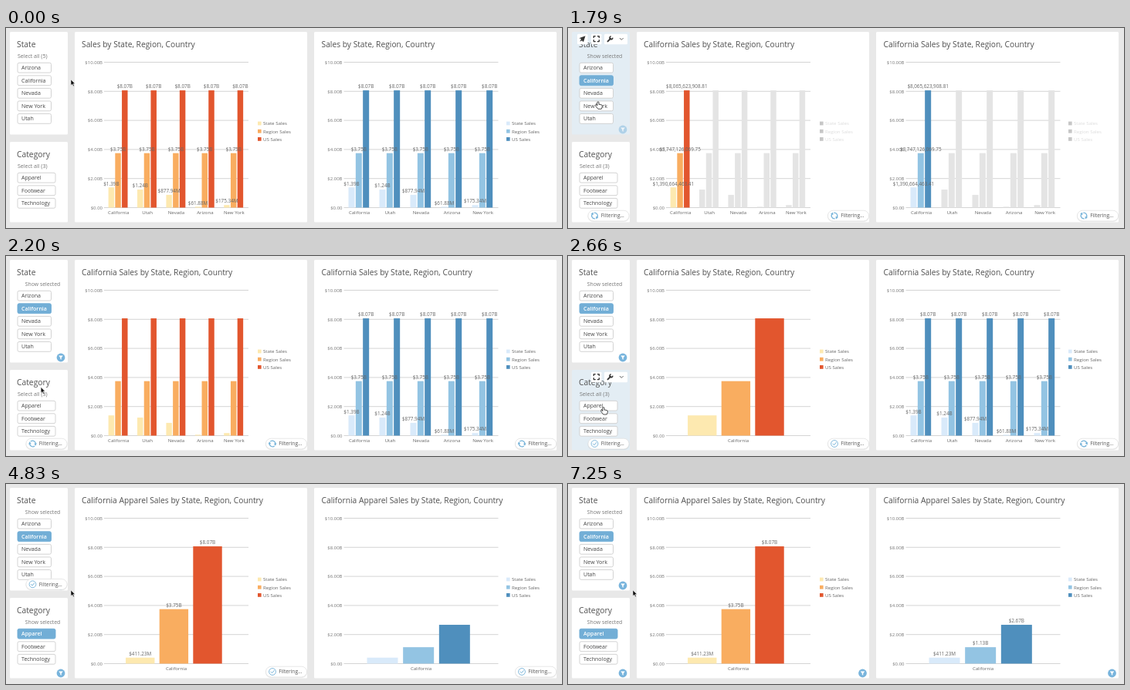
These frames come from a looping animation (720x260 px, 8 s). An HTML page:

```html
<!DOCTYPE html>
<html lang="en">
<head>
<meta charset="utf-8">
<title>Sales dashboard</title>
<style>
html, body { margin: 0; width: 100%; height: 100%; overflow: hidden; background: #e8e8e8; }
svg { display: block; width: 720px; height: 260px; font-family: "Open Sans", sans-serif; }
</style>
</head>
<body>
<svg id="stage" viewBox="0 0 720 260"></svg>
<script>
const LOOP = 8000;
const BASE = 233.5, UNIT = 18.9;
const svg = document.getElementById('stage');

const STATES = ['California', 'Utah', 'Nevada', 'Arizona', 'New York'];
const SALES = [1.39066, 1.24, 0.87794, 0.06188, 0.17534];
const SHORT = ['$1.39B', '$1.24B', '$877.94M', '$61.88M', '$175.34M'];
const EXACT = { 0: '$1,390,664,463.41', 2: '$877,943,757.07' };
const REGION = 3.747126, US = 8.065624, APPAREL = 0.41123;

const clamp = v => Math.max(0, Math.min(1, v));
const ramp = (t, a, b) => clamp((t - a) / (b - a));
const ease = (t, a, b) => { const u = ramp(t, a, b); return u * u * (3 - 2 * u); };
const mix = (a, b, u) => a + (b - a) * u;
const within = (t, a, b) => t >= a && t < b;

const rect = (x, y, w, h, fill, extra = '') =>
  `<rect x="${x}" y="${y}" width="${w}" height="${h}" fill="${fill}" ${extra}/>`;
const text = (x, y, size, str, fill = '#666', anchor = 'start') =>
  `<text x="${x}" y="${y}" font-size="${size}" fill="${fill}" text-anchor="${anchor}">${str}</text>`;
const group = (x, y, body, extra = '') => `<g transform="translate(${x} ${y})" ${extra}>${body}</g>`;
const stroke = (d, color, w = 1) =>
  `<path d="${d}" fill="none" stroke="${color}" stroke-width="${w}" stroke-linecap="round" stroke-linejoin="round"/>`;

// Charts

const CHARTS = [
  { panel: [89, 301], x: 127, w: 187, title: 98, legend: 326, colors: ['#fde9b0', '#f9ad60', '#e2562e'],
    single: [2250, 2480], end: [APPAREL, REGION, US], endText: ['$411.23M', '$3.75B', '$8.07B'],
    labels: [[0, 1250], [2900, 4330], [4830, LOOP]], fade: 1,
    badge: { on: 1150, off: 6400, spin: [[0, 2450], [3600, 4400]] } },
  { panel: [399, 314], x: 437.5, w: 200, title: 408.5, legend: 648, colors: ['#d9eafa', '#93c4e3', '#4f8fbd'],
    single: [3050, 3300], end: [APPAREL, 1.13, 2.67], endText: ['$411.23M', '$1.13B', '$2.67B'],
    labels: [[0, 1250], [2150, 3000], [3700, 4330], [5000, LOOP]], fade: 250,
    badge: { on: 1150, off: 6450, spin: [[0, 3250], [3600, 4450]] } }
];

function focusAt(t) {
  if (within(t, 1300, 1850)) return 0;
  return within(t, 1850, 2150) ? 2 : -1;
}

function drawChart(c, t) {
  const k = ease(t, ...c.single), shrink = ease(t, 4330, 4580);
  const focus = focusAt(t), dim = focus >= 0;
  const pitch = mix(c.w / 5, c.w, k);
  const barW = pitch * 0.2, step = pitch * 0.7 / 3;
  const prefix = t < 1060 ? '' : t < 3000 ? 'California ' : 'California Apparel ';
  let out = rect(c.panel[0], 5, c.panel[1], 247.5, '#fff', 'rx="1.5"');
  out += text(c.title, 25, 10.25, prefix + 'Sales by State, Region, Country', '#505050');

  for (let i = 0; i <= 5; i++) {
    const y = BASE - i * 2 * UNIT;
    out += rect(c.x, y - 0.5, c.w, 1, '#d4d4d4');
    out += text(c.x - 2, y + 2.2, 6, '$' + (i * 2).toFixed(2) + (i ? 'B' : ''), '#777', 'end');
  }

  let tags = '';
  const span = c.labels.find(([a, b]) => within(t, a, b));
  const shown = dim ? 1 : span ? (span[0] < 4800 ? 1 : ramp(t, span[0], span[0] + c.fade)) : 0;
  STATES.forEach((name, g) => {
    const alpha = g ? clamp(1 - k * 3) : 1;
    if (!alpha) return;
    const gx = c.x + g * pitch;
    const start = [SALES[g], REGION, US];
    const vals = start.map((v, i) => g ? v : mix(v, c.end[i], shrink));
    const on = !dim || focus === g;
    let bars = vals.map((v, i) => rect(gx + pitch * 0.15 + i * step, BASE - v * UNIT, barW, v * UNIT,
      on ? c.colors[i] : '#e4e4e4')).join('');
    bars += text(gx + pitch / 2, 242.2, 6.1, name, '#666', 'middle');
    out += `<g opacity="${alpha}">${bars}</g>`;
    if (!on || !shown) return;
    const names = dim ? [EXACT[g], '$3,747,126,069.75', '$8,065,623,908.81']
      : t > 4330 ? c.endText : [SHORT[g], '$3.75B', '$8.07B'];
    vals.forEach((v, i) => {
      tags += text(gx + pitch * 0.15 + i * step + barW / 2, BASE - v * UNIT - 2.7, 6.35, names[i], '#666', 'middle');
    });
  });
  out += `<g opacity="${shown}">${tags}</g>`;

  ['State Sales', 'Region Sales', 'US Sales'].forEach((s, i) => {
    const y = 124 + i * 10.2;
    out += rect(c.legend, y - 2.4, 4.6, 4.8, dim ? '#c6c6c6' : c.colors[i]);
    out += text(c.legend + 7, y + 2.3, 6.15, s, dim ? '#dcdcdc' : '#666');
  });
  const right = c.panel[0] + c.panel[1];
  return out + funnel(right - 8.5, 246, ramp(t, c.badge.off, c.badge.off + 180)) + badge(right, 244, c.badge, t, 180);
}

// Small parts

function funnel(x, y, alpha) {
  return alpha ? group(x, y, '<circle r="5.4" fill="#78b4dc"/><path d="M-2.8-2.5H2.8L.7.2V2.8L-.7 2V.2Z" fill="#fff"/>',
    `opacity="${alpha}"`) : '';
}

function badge(right, y, b, t, out) {
  const alpha = Math.min(ramp(t, b.on, b.on + 200), 1 - ramp(t, b.off, b.off + out));
  if (!alpha) return '';
  const blue = '#76b3d9';
  const spin = b.spin.some(([a, z]) => within(t, a, z));
  const icon = spin
    ? `<g transform="rotate(${t * 0.36 % 360})">` +
      stroke('M-3.7 1.2A3.9 3.9 0 0 1 1.6-3.5M3.7-1.2A3.9 3.9 0 0 1-1.6 3.5', blue, 1.3) +
      `<path d="M1-5.3L3.8-3 .6-1.7ZM-1 5.3L-3.8 3-.6 1.7Z" fill="${blue}"/></g>`
    : `<circle r="4.4" fill="none" stroke="${blue}" stroke-width=".9"/>` + stroke('M-2 .1L-.5 1.7 2.2-1.5', blue, 1);
  const body = rect(-54, -6, 54, 14, '#000', 'rx="7" opacity=".07"') +
    rect(-53.6, -6.8, 53.2, 13.8, '#fff', 'rx="6.9" stroke="#ddd" stroke-width=".7"') +
    group(-45, 0, icon) + text(-36.8, 2.4, 6.6, 'Filtering...', '#555');
  return group(right, y + (1 - alpha) * 6, body, `opacity="${alpha}"`);
}

function toolbar(y, full) {
  const ink = '#333';
  const box = (x, w) => rect(x, -6.5, w, 13.5, '#fff', 'rx="1.5"');
  let out = box(30, 13.5) + box(47, 30);
  if (full) out += box(12, 13.5) + `<path d="M22.5-4L14.3-.9 17-.1 15.5 3.6 18 2 20 4Z" fill="${ink}"/>`;
  out += stroke('M33.3-1.6V-3.6H35.3M38.3-3.6H40.3V-1.6M40.3 1.4V3.4H38.3M35.3 3.4H33.3V1.4', ink, 1.3);
  out += stroke('M51.5 3.2L55.2-.6', ink, 1.9) + stroke('M55.3-3.3A2 2 0 1 0 57.8-.9', ink, 1.5);
  out += stroke('M67.2-.9L69.3 1.2 71.4-.9', '#555', 0.9);
  return group(0, y, out);
}

// Filter panels

const FILTERS = [
  { y: 5, h: 133.5, title: 'State', all: 'Select all (5)', items: ['Arizona', 'California', 'Nevada', 'New York', 'Utah'],
    w: 43.5, pick: 1, click: 1000, hover: [130, 2200], dot: 132, dotOn: [1600, 2000], badgeY: 130.3,
    badge: { on: 3350, off: 5790, spin: [[0, 4400]] }, out: 45 },
  { y: 148, h: 104.5, title: 'Category', all: 'Select all (3)', items: ['Apparel', 'Footwear', 'Technology'],
    w: 49, pick: 0, click: 2850, hover: [2300, 3750], dot: 246, dotOn: [3700, 3900], badgeY: 244,
    badge: { on: 1150, off: 3700, spin: [[0, 2500]] }, out: 200 }
];

function drawFilter(f, t) {
  const hovered = within(t, ...f.hover), picked = t >= f.click;
  let out = rect(5, f.y, 75, f.h, hovered ? '#e3edf4' : '#fff', 'rx="1.5"');
  out += text(14, f.y + 20, 10.3, f.title, '#505050');
  out += picked ? text(70.3, f.y + 34.3, 6.85, 'Show selected', '#777', 'end')
    : text(15, f.y + 34.3, 7, f.all, '#777');
  f.items.forEach((name, i) => {
    const y = f.y + 46.6 + i * 16.55, on = picked && i === f.pick;
    const warm = f.y === 5 && ((i === 1 && within(t, 200, 1000)) || (i === 2 && within(t, 1850, 2150)));
    out += rect(15, y - 6.3, f.w, 12.8, on ? '#72aed6' : warm ? '#dce9f3' : '#fff',
      `rx="2" stroke="${on ? '#72aed6' : '#cfcfcf'}" stroke-width=".9"`);
    out += `<g font-weight="${on ? 600 : 500}">${text(20, y + 2.5, 7.05, name, on ? '#fff' : '#444')}</g>`;
  });
  if (hovered) out += toolbar(f.y + 9.2, picked);
  return out + funnel(71, f.dot, ramp(t, ...f.dotOn)) + badge(79.5, f.badgeY, f.badge, t, f.out);
}

// Pointer: time, x, y
const PATH = [
  [0, 84, 67], [40, 84, 67], [250, 38, 66], [1400, 38, 66], [1790, 39, 96], [2000, 44.5, 149],
  [2450, 46, 197], [3150, 46, 197], [3450, 60, 180], [3950, 84, 138], [LOOP, 84, 138]
];

function pointer(t) {
  const i = PATH.findIndex((p, n) => n && t <= p[0]);
  const a = PATH[i - 1], b = PATH[i], u = ramp(t, a[0], b[0]);
  const x = mix(a[1], b[1], u), y = mix(a[2], b[2], u);
  const top = y > 150 ? 188 : 45, bottom = y > 150 ? 234 : 124;
  const link = x > 15 && x < 64 && y > top && y < bottom || within(t, 3150, 3550);
  const d = link
    ? 'M-1.2 .2Q0-1 1 .2V3.2L2 2.9 3 3.5 4 3.4 5.2 4.2V6.6L4.2 9H-.2L-3.2 5.2Q-3-.1-1.2 4.6Z'
    : 'M0 0V7.6L1.8 6 3.1 8.8 4.3 8.2 3.1 5.5H5.4Z';
  const paint = link ? 'fill="#fff" stroke="#222" stroke-width=".8"' : 'fill="#111" stroke="#fff" stroke-width=".5"';
  return group(x, y, `<path d="${d}" ${paint} stroke-linejoin="round"/>`);
}

function draw(t) {
  svg.innerHTML = rect(0, 0, 720, 260, '#e8e8e8') +
    CHARTS.map(c => drawChart(c, t)).join('') +
    FILTERS.map(f => drawFilter(f, t)).join('') + pointer(t);
}

const began = performance.now();
function tick() {
  draw((performance.now() - began) % LOOP);
  requestAnimationFrame(tick);
}
tick();
</script>
</body>
</html>
```
